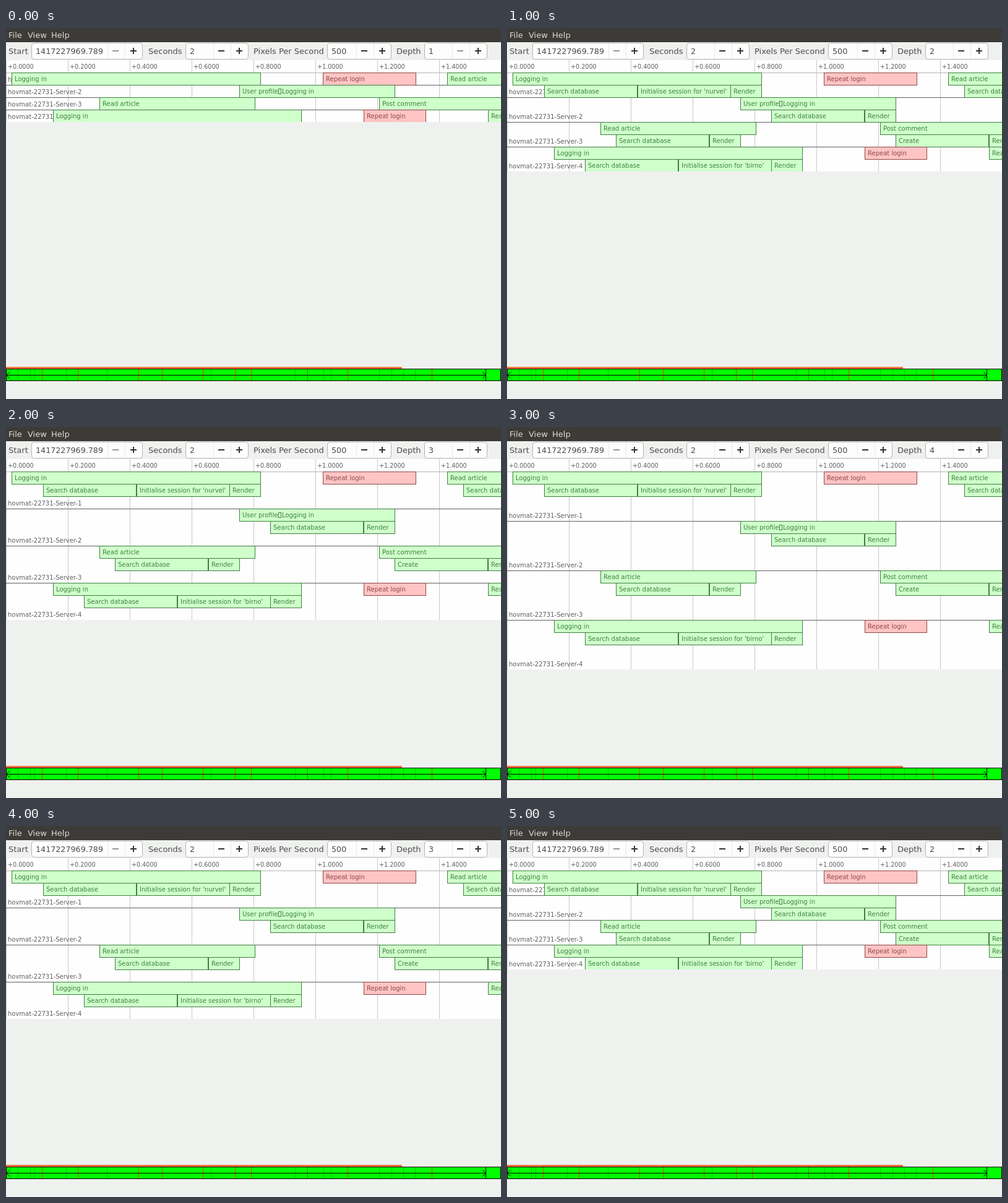
Recreate the animation shown at these times as an HTML page. Size 800x600 px, loop 6 s.

```html
<!DOCTYPE html>
<html lang="en">
<head>
<meta charset="utf-8">
<title>Thread timeline</title>
<style>
  html, body { margin: 0; width: 100%; height: 100%; overflow: hidden; background: #eff1ef; }
  svg { display: block; shape-rendering: crispEdges; }
  text { font: 10px "DejaVu Sans", sans-serif; white-space: pre; }
  .ui { font-size: 13px; fill: #4c4c4c; }
  .number { font-size: 12.7px; fill: #4c4c4c; }
  .menu { font-size: 13px; fill: #dfdbd2; }
  .tick { font-size: 9.6px; fill: #606060; }
  .label { fill: #606060; }
</style>
</head>
<body>
<svg id="stage" width="800" height="600" viewBox="0 0 800 600"></svg>
<script>
const stage = document.getElementById('stage');
const TOP = 72, ROW = 20, DURATION = 6000;
const depthSteps = [1, 2, 3, 4, 3, 2];
const GREEN = ['#cfffcb', '#408040'], RED = ['#ffc4c4', '#904848'];

// Each bar: nesting level, left edge, right edge, caption, colours.
const tracks = [
  [[0, 9, 411, 'Logging in'], [1, 60, 210, 'Search database'],
   [1, 211, 361, "Initialise session for 'nurvel'"], [1, 361, 411, 'Render'],
   [0, 512, 662, 'Repeat login', RED], [0, 713, 830, 'Read article'],
   [1, 739, 830, 'Search database']],
  [[0, 377, 628, 'User profile\nLogging in'], [1, 427, 577, 'Search database'],
   [1, 578, 628, 'Render']],
  [[0, 151, 402, 'Read article'], [1, 176, 326, 'Search database'], [1, 327, 377, 'Render'],
   [0, 603, 830, 'Post comment'], [1, 628, 778, 'Create'], [1, 779, 830, 'Render']],
  [[0, 76, 477, 'Logging in'], [1, 126, 276, 'Search database'],
   [1, 277, 427, "Initialise session for 'birno'"], [1, 427, 477, 'Render'],
   [0, 578, 678, 'Repeat login', RED], [0, 779, 830, 'Read article']],
];

function add(parent, tag, attrs, content) {
  const node = document.createElementNS('http://www.w3.org/2000/svg', tag);
  for (const key in attrs) node.setAttribute(key, attrs[key]);
  if (content !== undefined) node.textContent = content;
  return parent.appendChild(node);
}
const fillRect = (parent, x, y, width, height, fill) =>
  add(parent, 'rect', { x, y, width, height, fill });
const outline = (parent, x, y, width, height, fill, stroke) =>
  add(parent, 'rect', { x: x + .5, y: y + .5, width, height, fill, stroke });
const write = (parent, x, y, content, attrs) =>
  add(parent, 'text', { x, y, ...attrs }, content);

function drawBar(parent, y, left, right, caption, [fill, ink]) {
  outline(parent, left, y, right - left, ROW, fill, ink);
  const [first, second] = caption.split('\n');
  write(parent, left + 5, y + 14, first, { fill: ink });
  if (second) {
    // A line break in the caption shows as an empty glyph box.
    outline(parent, left + 63, y + 6, 4, 8, 'none', ink);
    write(parent, left + 69, y + 14, second, { fill: ink });
  }
}

function drawButtons(parent, right, canDecrease) {
  const dark = '#333333';
  fillRect(parent, right - 49, 36, 10, 2, canDecrease ? dark : '#999999');
  fillRect(parent, right - 20, 36, 10, 2, dark);
  fillRect(parent, right - 16, 32, 2, 10, dark);
}

function drawSpinBox(left, right) {
  add(stage, 'rect', {
    x: left + .5, y: 24.5, width: right - left - 1, height: 26, rx: 4,
    fill: '#fdfdfd', stroke: '#b5b6b3', 'shape-rendering': 'auto',
  });
  for (const x of [right - 57, right - 29]) fillRect(stage, x, 25, 1, 25, '#e9e9e8');
}

function drawToolbar() {
  fillRect(stage, 0, 0, 800, 23, '#3c3b37');
  [[4, 'File'], [35, 'View'], [73, 'Help']].forEach(([x, name]) =>
    write(stage, x, 16, name, { class: 'menu' }));
  const fields = [
    [4, 'Start', 41, 221, '1417227969.789', false],
    [230, 'Seconds', 290, 392, '2', true],
    [400, 'Pixels Per Second', 519, 623, '500', true],
    [631, 'Depth', 676, 778],
  ];
  for (const [x, name, left, right, value, canDecrease] of fields) {
    write(stage, x, 42, name, { class: 'ui' });
    drawSpinBox(left, right);
    if (!value) continue;
    write(stage, left + 7, 42, value, { class: 'number' });
    drawButtons(stage, right, canDecrease);
  }
}

function drawOverview() {
  fillRect(stage, 0, 548, 640, 3, '#f9703e');
  outline(stage, 0, 551, 799, 19, '#00ff00', '#000000');
  const marks = (list, color) => list.forEach(x => fillRect(stage, x, 552, 1, 18, color));
  marks([7, 19, 39, 46, 97, 163, 331, 467, 513, 525, 603, 623, 642, 661], '#00c400');
  marks([58, 116, 214, 252, 318, 370, 396, 552, 688], '#c85000');
  marks([487], '#5a7800');
  fillRect(stage, 0, 561, 776, 1, '#000000');
  fillRect(stage, 775, 551, 1, 20, '#000000');
  add(stage, 'path', {
    d: 'M5.5 556.5l-5 5l5 5M770.5 556.5l5 5l-5 5',
    fill: 'none', stroke: '#000000', 'shape-rendering': 'auto',
  });
}

function drawTimeline(depth) {
  const trackHeight = ROW * depth;
  const bottom = TOP + trackHeight * tracks.length;
  const view = add(stage, 'svg', { width: 800, height: bottom, overflow: 'hidden' });
  fillRect(view, 0, 52, 800, bottom - 52, '#fefefe');
  for (let i = 0; i < 8; i++) {
    fillRect(view, i * 100, 52, 1, bottom - 52, '#c8c8c8');
    write(view, i * 100 + 3, 66, '+' + (i / 5).toFixed(4), { class: 'tick' });
  }
  tracks.forEach((bars, i) => {
    const y = TOP + i * trackHeight;
    fillRect(view, 0, y, 800, 1, i ? '#606060' : '#b4b4b4');
    write(view, 3, y + trackHeight - 5, `hovmat-22731-Server-${i + 1}`, { class: 'label' });
  });
  tracks.forEach((bars, i) => {
    for (const [level, left, right, caption, colors = GREEN] of bars) {
      if (level < depth)
        drawBar(view, TOP + i * trackHeight + level * ROW, left, right, caption, colors);
    }
  });
  write(view, 683, 42, depth, { class: 'number' });
  drawButtons(view, 778, depth > 1);
  return view;
}

drawToolbar();
drawOverview();
for (const depth of new Set(depthSteps)) {
  const frames = [...depthSteps, depthSteps[0]].map((step, i) => ({
    offset: i / depthSteps.length,
    visibility: step === depth ? 'visible' : 'hidden',
    easing: 'steps(1, end)',
  }));
  drawTimeline(depth).animate(frames, { duration: DURATION, iterations: Infinity });
}
</script>
</body>
</html>
```
